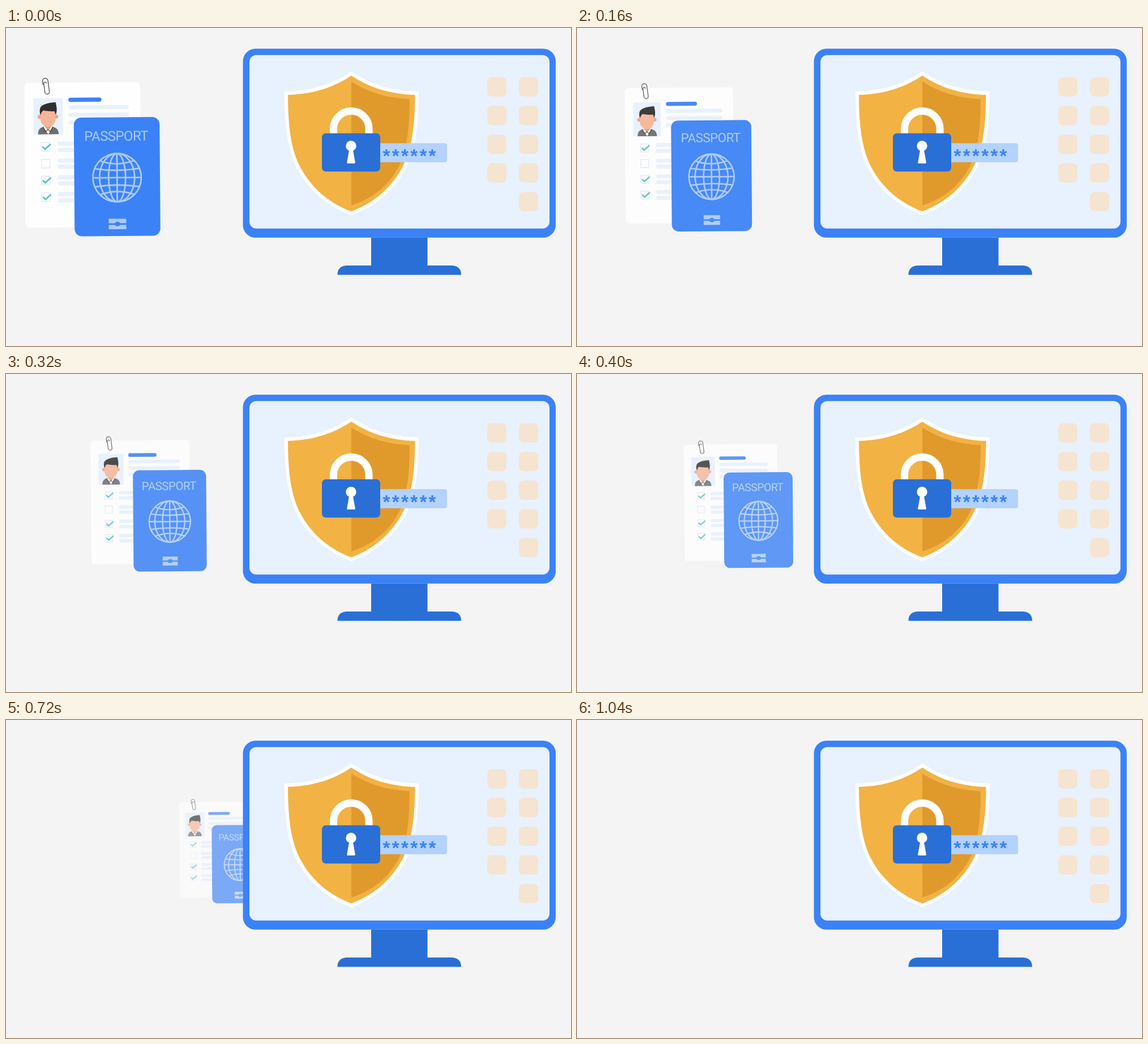
An HTML page that plays this animation: 998 by 561 pixels, repeating every 1520 ms.

```html
<!DOCTYPE html>
<html lang="en">
<head>
<meta charset="utf-8">
<title>Secure document upload</title>
<style>
  html, body { margin: 0; width: 100%; height: 100%; overflow: hidden; background: #f4f4f4; }
  svg { display: block; width: 100vw; height: 100vh; }
  .blue { fill: #3b82f6; }
  .deep { fill: #2a6fd6; }
  .pale { fill: #e8f1fe; }
  .sky { fill: #abcafb; }
  .line { fill: none; stroke: #abcafb; stroke-width: 2.8; }
  .title { font: 24px Roboto, "Open Sans", sans-serif; letter-spacing: -0.6px; }
  .stars { font: bold 33px "Liberation Sans", Arial, sans-serif; text-anchor: middle; }
</style>
</head>
<body>
<svg viewBox="0 0 998 561" xmlns="http://www.w3.org/2000/svg">
  <g id="docs">
    <g transform="rotate(-.5 135.5 224)">
      <rect x="33.3" y="96" width="204.7" height="255.5" rx="7" fill="#fefefe"/>
      <rect class="pale" x="49" y="123.5" width="52" height="64"/>
      <g id="portrait">
        <path d="M57 187c0-9 4-12 11-13.500h13c8 1.500 12 4.500 12.500 13.500z" fill="#6d6e71"/>
        <path d="M67 175l8 12 7-12-2-3H69z" fill="#fff"/>
        <path d="M69 167h11v7l-5.500 6-5.500-6z" fill="#e39e80"/>
        <path d="M66 174.500l4 8 4.500-4 4.500 4 4-8" fill="none" stroke="#47484a" stroke-width="1.300"/>
        <circle cx="60" cy="156" r="3.500" fill="#eaa586"/>
        <circle cx="89.500" cy="156" r="3.500" fill="#eaa586"/>
        <path d="M61.500 143h26.500v17c0 8-7 14-13.200 14s-13.300-6-13.300-14z" fill="#f4b598"/>
        <path d="M61.500 153c-2-7-2-14 4-17 6-4 15-5 23-5.500l1.500 8c1 5 0 10-1.500 14.500l-2-6.500c-7 .5-14-.5-20-1.500-3 2-3.500 5-5 8z" fill="#302f2f"/>
      </g>
      <rect class="blue" x="111" y="122.700" width="58.500" height="7.500" rx="3.700"/>
      <g id="lines" class="pale"></g>
      <g id="boxes" fill="#fff" stroke="#dfe9fa" stroke-width="1.500"></g>
      <g id="ticks" fill="none" stroke="#5bc5bd" stroke-width="2.800"></g>
      <path d="M-5-3V-9.500a4.800 4.800 0 0 1 9.600 0V10a4 4 0 0 1-8 0V-5a2.400 2.400 0 0 1 4.800 0" transform="translate(71.800 102.200) rotate(-7)" fill="none" stroke="#4b4b4b" stroke-width="1.300"/>
    </g>
    <g transform="rotate(-.45 196.250 262)">
      <rect class="blue" x="120.500" y="157.500" width="151.500" height="209.500" rx="13"/>
      <text class="sky title" x="138.700" y="198.800">PASSPORT</text>
      <g id="globe" class="line" transform="translate(196.200 264)">
        <circle r="42.700"/>
        <ellipse rx="15" ry="42.700"/>
        <ellipse rx="31" ry="42.700"/>
        <path d="M0-42.700V42.700M-42.700 0H42.700"/>
      </g>
      <rect class="sky" x="180.800" y="336.500" width="31" height="18.500"/>
      <path class="blue" d="M180 344.300h32.500v3H180z"/>
      <ellipse class="blue" cx="196.300" cy="345.800" rx="5.200" ry="4"/>
    </g>
  </g>

  <rect class="blue" x="418.500" y="36.500" width="552.500" height="333.300" rx="22"/>
  <rect class="pale" x="430" y="47.700" width="530" height="306" rx="12"/>
  <path class="deep" d="M645 369.800h99.500V419H788q16 1 16 16.500H585.500q0-15.500 16-16.500H645z"/>
  <g id="tiles" fill="#f5e4cf"></g>

  <path d="M610 84C577 106 540 117 498 118C498 170 503 212 518 242C537 280 570 309 610 323.500C650 309 683 280 702 242C717 212 722.500 170 722.500 118C680 117 643 106 610 84z" fill="#f2b244" stroke="#fff" stroke-width="12.500" paint-order="stroke"/>
  <path d="M610 94.500C640 114 675 124 713 125.500C713 178 708 218 693 246C675 279 647 301 610 313z" fill="#e09a2c"/>

  <rect x="640" y="203.200" width="139" height="33.600" rx="4" fill="#b3d2fc"/>
  <text class="blue stars" id="stars" y="236.500">******</text>
  <path d="M578.500 190V177.800a31.300 31.300 0 0 1 62.600 0V190" fill="none" stroke="#fff" stroke-width="13"/>
  <rect class="deep" x="558" y="185.700" width="103" height="67.600" rx="7"/>
  <circle cx="609.500" cy="208" r="9.200" fill="#fff"/>
  <path d="M606.500 213h6l4.300 24q.2 2-1.500 2h-11.600q-1.700 0-1.500-2z" fill="#fff"/>
</svg>
<script>
  const STEP = 80, LOOP = 1520, LAST = 13, FPS = 30;
  const byId = id => document.getElementById(id);

  function add(parent, tag, attrs) {
    const el = document.createElementNS("http://www.w3.org/2000/svg", tag);
    for (const key in attrs) el.setAttribute(key, attrs[key]);
    byId(parent).appendChild(el);
  }

  const bar = (x, y, width) => add("lines", "rect", { x, y, width, height: 7.3, rx: 3.5 });

  for (let i = 0; i < 3; i++) bar(111, 136.2 + 13.3 * i, 106.5);

  for (let i = 0; i < 4; i++) {
    const y = 201.7 + 29.6 * i;
    add("boxes", "rect", { x: 62.5, y, width: 15, height: 15 });
    if (i !== 1) add("ticks", "path", { d: `M64.500 ${y + 7}l4.500 4.500 10-9` });
    bar(91, y - 1.5, 60);
    bar(91, y + 9.5, 60);
  }

  // Parallels that bend towards the equator
  for (const [y, half, bend] of [[16, 39.5, 6], [30, 30.5, 11]]) {
    for (const side of [-1, 1]) {
      add("globe", "path", { d: `M${-half} ${side * y}Q0 ${side * (y - bend)} ${half} ${side * y}` });
    }
  }

  for (let row = 0; row < 5; row++) {
    for (let col = row < 4 ? 0 : 1; col < 2; col++) {
      add("tiles", "rect", { x: 850.2 + 56 * col, y: 87 + 50.6 * row, width: 33.8, height: 33.8, rx: 8 });
    }
  }

  byId("stars").setAttribute("x", Array.from({ length: 6 }, (_, i) => 672 + 16.2 * i).join(" "));

  // Documents slide linearly behind the screen, sampled at a coarse rate
  const docs = byId("docs");
  const start = performance.now();

  function draw(now) {
    const time = Math.max(0, now - start) % LOOP;
    const step = Math.min(LAST, Math.floor(time / STEP));
    const n = Math.floor(step * STEP * FPS / 1000);
    docs.setAttribute("transform", `translate(${13.55 * n} ${3.89 * n}) scale(${1 - 0.0163 * n})`);
    docs.setAttribute("opacity", 1 - n / 60);
    requestAnimationFrame(draw);
  }
  draw(start);
</script>
</body>
</html>
```
